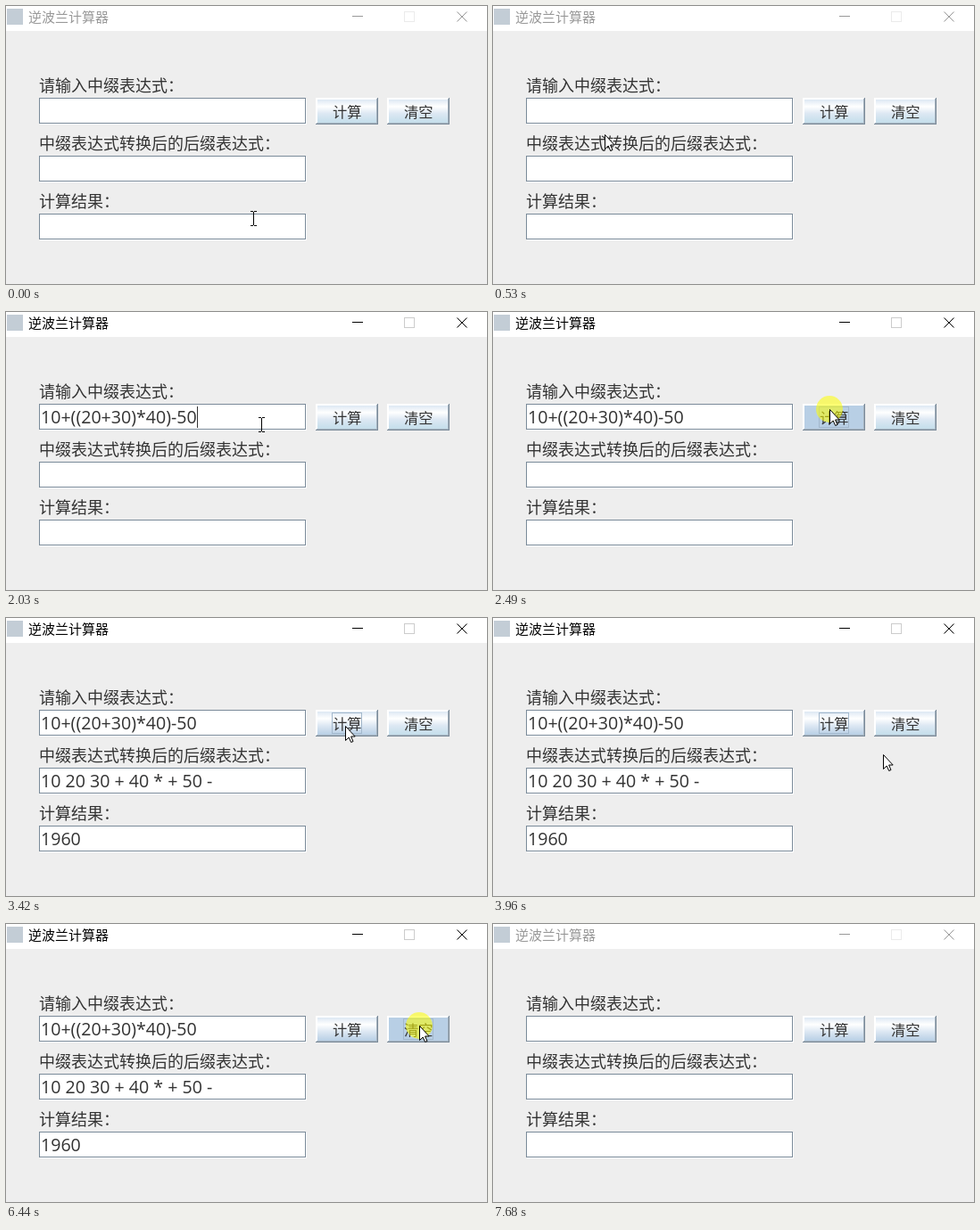
Animation of 539 by 312 pixels, one loop 7.76 s. Source, as an HTML page with a canvas:

```html
<!DOCTYPE html>
<html lang="zh-CN">
<head>
<meta charset="utf-8">
<style>
html, body { margin: 0; height: 100%; overflow: hidden; background: #eee; }
canvas { display: block; }
</style>
</head>
<body>
<canvas id="stage" width="539" height="312"></canvas>
<script>
const g = document.getElementById('stage').getContext('2d');
const CJK = '"Noto Sans CJK SC", "Noto Sans CJK", sans-serif';
const LATIN = '"Open Sans", "Noto Sans", sans-serif';

// Timeline in ms
const LOOP = 7760, STEP = 77, BLINK = 500;
const FOCUS = 770, PASTE = 1560, CALC = 2400, SOLVED = 2640;
const CLEAR = 6440, CLEARED = 6670, LEAVE = 7130, BLUR = 7680;

const rows = [
  { label: '请输入中缀表达式：', value: '10+((20+30)*40)-50', shown: PASTE },
  { label: '中缀表达式转换后的后缀表达式：', value: '10 20 30 + 40 * + 50 -', shown: SOLVED },
  { label: '计算结果：', value: '1960', shown: SOLVED }
];
const rowTop = i => 103 + 65 * i;

// Pointer glides to each stop; bow is the sag of the path
const stops = [
  { at: 0, x: 275, y: 237 },
  { at: 70, end: 692, x: 73, y: 111 },
  { at: PASTE, end: 2320, x: 375, y: 109, bow: 18 },
  { at: CALC, x: 377, y: 109 },
  { at: 3420, x: 380, y: 121 },
  { at: 3500, x: 418, y: 148 },
  { at: 3650, end: 4420, x: 463, y: 114, bow: 20 },
  { at: 6980, end: 7055, x: 502, y: 268 }
];

const within = (t, a, b) => t >= a && t < b;
const mix = (a, b, p) => a + (b - a) * p;

function pointerAt(t) {
  const i = stops.findLastIndex(s => s.at <= t);
  const { at, end = at, x, y, bow = 0 } = stops[i];
  const from = stops[i - 1] || stops[i];
  const steps = Math.round((end - at) / STEP) + 1;
  const done = Math.min(steps, Math.floor((t - at) / STEP) + 1) / steps;
  const p = done * done * (3 - 2 * done);
  return [mix(from.x, x, p), mix(from.y, y, p) + bow * 4 * p * (1 - p)];
}

function box(color, x, y, w, h) {
  g.fillStyle = color;
  g.fillRect(x, y, w, h);
}

function frame(color, x, y, w, h) {
  g.strokeStyle = color;
  g.strokeRect(x + 0.5, y + 0.5, w - 1, h - 1);
}

function text(str, x, y, size, color = '#333', family = CJK) {
  g.font = `${size}px ${family}`;
  g.fillStyle = color;
  g.fillText(str, x, y);
}

function titleBar(active) {
  const ink = active ? '#000' : '#999';
  box('#fff', 0, 0, 539, 28);
  box('#c3cdd6', 1, 3, 18, 18);
  text('逆波兰计算器', 25, 18, 15, ink);
  box(ink, 388, 11, 12, 1);
  frame(active ? '#ccc' : '#ebebeb', 446, 6, 12, 12);
  g.strokeStyle = ink;
  g.stroke(new Path2D('M505.5 6.5l11 11m0-11l-11 11'));
}

function field(y, str, caret) {
  box('#fff', 38, y + 1, 299, 29);
  frame('#7a8a99', 37, y, 299, 29);
  text(str, 39, y + 22, 19.6, '#333', LATIN);
  if (caret) box('#333', 39 + Math.round(g.measureText(str).width), y + 3, 1, 24);
}

function button(x, str, t, press, release, blur) {
  const y = rowTop(0);
  const fill = g.createLinearGradient(0, y + 2, 0, y + 28);
  const base = t < release ? '#c4deeb' : '#b8cfe5';
  ['#dde8f3', '#fff', '#dde8f3', base].forEach((c, i) => fill.addColorStop(i < 3 ? i * 0.3 : 1, c));
  box('#7a8a99', x, y, 70, 30);
  box('#fff', x, y, 69, 29);
  box('#a3b0bc', x + 1, y + 1, 68, 28);
  box('#fff', x + 1, y + 1, 67, 27);
  box(within(t, press, release) ? '#b8cfe5' : fill, x + 2, y + 2, 66, 26);
  if (within(t, press, blur)) frame('#a3b8cc', x + 18, y + 3, 34, 24);
  text(str, x + 19, y + 22, 16.3);
}

function pointer(x, y) {
  const inField = within(x, 37, 337) && rows.some((_, i) => within(y, rowTop(i), rowTop(i) + 30));
  g.save();
  g.translate(Math.round(x), Math.round(y));
  if (inField) {
    box('#000', 2, -6, 1, 15);
    for (const end of [-7, 9]) {
      box('#000', -1, end, 3, 1);
      box('#000', 3, end, 3, 1);
    }
  } else {
    const arrow = new Path2D('M.5 .5V16.5L4.2 13L6.7 18.5L9 17.5L6.6 12H11.2Z');
    g.fillStyle = '#fff';
    g.fill(arrow);
    g.strokeStyle = '#000';
    g.stroke(arrow);
  }
  g.restore();
}

function clickSpot(x, y) {
  g.fillStyle = 'rgba(255, 255, 0, .55)';
  g.beginPath();
  g.arc(x, y, 15, 0, Math.PI * 2);
  g.fill();
}

function draw(t) {
  box('#eee', 0, 0, 539, 312);
  titleBar(within(t, FOCUS, BLUR));
  const caret = [FOCUS, PASTE].some(on => within(t, on, on + BLINK - 20));
  rows.forEach(({ label, value, shown }, i) => {
    text(label, 37, rowTop(i) - 7, 18);
    field(rowTop(i), within(t, shown, CLEARED) ? value : '', caret && i === 0);
  });
  button(347, '计算', t, CALC, SOLVED, CLEAR);
  button(427, '清空', t, CLEAR, CLEARED, BLUR);

  const spot = pointerAt(t);
  const clicking = within(t, FOCUS, FOCUS + 80) || within(t, CALC, SOLVED) || within(t, CLEAR, CLEARED);
  if (clicking) clickSpot(...spot);
  if (t < LEAVE) pointer(...spot);
}

let began;
function tick(now) {
  began ??= now;
  draw((now - began) % LOOP);
  requestAnimationFrame(tick);
}
requestAnimationFrame(tick);
</script>
</body>
</html>
```
